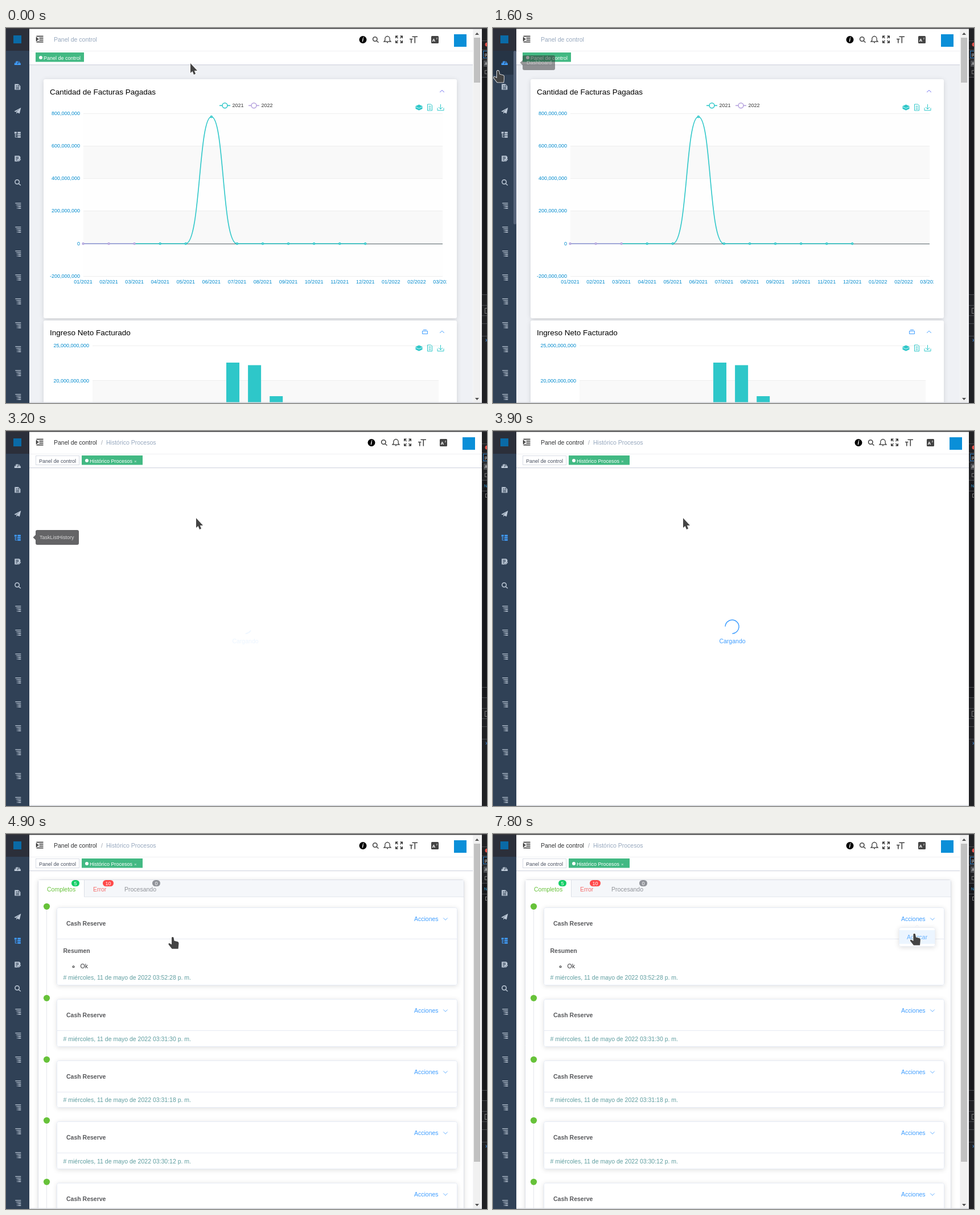
An HTML page with a canvas that plays this animation: 845x659 px, repeating every 8 s.

```html
<!DOCTYPE html>
<html lang="es">
<head>
<meta charset="utf-8">
<style>
html, body { margin: 0; width: 100%; height: 100%; overflow: hidden; }
canvas { display: block; }
</style>
</head>
<body>
<canvas id="stage" width="845" height="659"></canvas>
<script>
const ctx = document.getElementById('stage').getContext('2d');
const LOOP = 8000;
const TEAL = '#2ec7c9', PURPLE = '#b6a2de', BLUE = '#409eff', AXIS = '#008acd', PALE = '#bfcbd9';

// time, x, y of the pointer tip
const POINTER = [
  [0, 324, 62], [100, 324, 62], [300, 320, 70], [500, 320, 70], [800, 150, 104],
  [1000, 24, 100], [1100, 12, 80], [1200, 4, 53], [1300, 3, 46], [1400, 5, 44],
  [1500, 7, 52], [1700, 12, 98], [2200, 18, 182], [3100, 18, 182], [3200, 334, 153],
  [3900, 334, 153], [4000, 330, 150], [4700, 330, 150], [5200, 239, 228], [5400, 243, 234],
  [5600, 243, 234], [5700, 330, 215], [5800, 600, 180], [5900, 733, 164], [6400, 733, 164],
  [6500, 744, 154], [7300, 744, 154], [7400, 741, 172], [7500, 741, 172],
  [7600, 751, 175], [7700, 751, 175], [7800, 741, 175], [8000, 741, 175]];

const ICON = {
  gauge: 'M-5.5 4A5.6 5.6 0 1 1 5.5 4ZM-4-.5h1.6v1.3H-4ZM2.4-.5H4V.8H2.4ZM-2.5-3h1.4v1.3h-1.4ZM.7 2.5L2-2.6l-1-.2L-.6 2.2Z',
  doc: 'M-5-5H1.5L5-1.5V5H-5ZM1-4V-1H4ZM-3-2.5v1.2h3v-1.2ZM-3 .2v1.2H3V.2ZM-3 2.5v1.2H3V2.5Z',
  plane: 'M-6 1L6-5.5 3.5 5-.3 3.1-2 5.5V2L4-3.6-3.2 2Z',
  tree: 'M-5.5-5h4v3h-4ZM0-5h5.5v3H0ZM0-1h5.5v2.6H0ZM0 2.6h5.5v2.6H0ZM-4.5-1.5h1v1.6h3v1h-3v2.6h3v1h-4Z',
  edit: 'M-5-5H3L5-3V0L0 5H-5ZM-3-3v1.2h5V-3ZM-3-.7v1.2h5V-.7ZM-3 1.7v1.2h3V1.7ZM1.5 4L5 .5l1 1L2.5 5H1Z',
  list: 'M-5-5.2H5v1.3H-5ZM-2-2.3h7V-1h-7ZM0 .6h5v1.3H0ZM0 3.6h5v1.3H0ZM-3.6-2.2h1V-1h-1ZM-2 .6h1v1.3h-1ZM-2 3.6h1v1.3h-1Z',
  search: 'M3-1A3.7 3.7 0 1 1-4.4-1A3.7 3.7 0 1 1 3-1ZM2 2L5.5 5',
  menu: 'M-6-5H6M-1-1.7H6M-1 1.7H6M-6 5H6M-6-2.5L-3 0-6 2.5Z',
  bell: 'M-6 3.8H6L4.2 2V-1A4.2 4.4 0 0 0-4.2-1V2ZM-1 5.7H1M0-5V-6.3',
  full: 'M-2-2L-5.5-5.5M-5.8-2V-5.8H-2M2-2L5.5-5.5M5.8-2V-5.8H2M-2 2L-5.5 5.5M-5.8 2V5.8H-2M2 2L5.5 5.5M5.8 2V5.8H2',
  size: 'M-2.5-5.2H7M2.3-5.2V6M-7-1H-1.5M-4.2-1V6',
  layers: 'M0-5L6-2.3V2.5L0 5.3-6 2.5V-2.3Z',
  sheet: 'M-4-5.5H2L4-3.5V5.5H-4ZM-2-2H2M-2 .5H2M-2 3H2',
  download: 'M0-5.5V3M-3.5-.5L0 3 3.5-.5M-5.5 1V5.3H5.5V1',
  box: 'M-4.5-1H4.5V4H-4.5ZM-3-3.2H3',
  up: 'M-3.7 2L0-1.8 3.7 2',
  down: 'M-3.7-2L0 1.8 3.7-2',
  arrow: 'M0 0V17L3.6 14 6 20 9 18.6 6.8 13H12Z',
  hand: 'M-2.6 1Q-1.5-1 .8.6L2 6.5 8 8Q10.2 8.8 9.8 12L9 20.5H-2L-8 13Q-8.6 10-6 11L-2.6 13Z'
};
for (const k in ICON) ICON[k] = new Path2D(ICON[k]);

const clamp = v => Math.max(0, Math.min(1, v));
const fade = (t, start, end) => clamp(Math.min(t - start, end + 200 - t) / 200);

function rect(x, y, w, h, color) { ctx.fillStyle = color; ctx.fillRect(x, y, w, h); }

function dot(x, y, r, color) {
  ctx.fillStyle = color;
  ctx.beginPath(); ctx.arc(x, y, r, 0, 7); ctx.fill();
}

function round(x, y, w, h, r, color) {
  ctx.fillStyle = color;
  ctx.beginPath(); ctx.roundRect(x, y, w, h, r); ctx.fill();
}

// y is the middle of the capital letters
function text(s, x, y, color, size = 10.5, align = 'left', style = '') {
  ctx.font = `${style} ${size}px "Liberation Sans", Arial, sans-serif`;
  ctx.textAlign = align;
  ctx.fillStyle = color;
  ctx.fillText(s, x, y + size * 0.355);
}

function icon(name, x, y, color, line = 0) {
  ctx.save();
  ctx.translate(x, y);
  if (line) { ctx.strokeStyle = color; ctx.lineWidth = line; ctx.stroke(ICON[name]); }
  else { ctx.fillStyle = color; ctx.fill(ICON[name], 'evenodd'); }
  ctx.restore();
}

function card(x, y, w, h, border) {
  ctx.save();
  ctx.shadowColor = 'rgba(0,0,0,.13)'; ctx.shadowBlur = 9; ctx.shadowOffsetY = 1.5;
  round(x, y, w, h, 3, '#fff');
  ctx.restore();
  if (border) {
    ctx.strokeStyle = border; ctx.lineWidth = 1;
    ctx.beginPath(); ctx.roundRect(x + .5, y + .5, w - 1, h - 1, 3); ctx.stroke();
  }
}

function toolbox(y) {
  icon('layers', 725.5, y, TEAL);
  ctx.strokeStyle = '#fff'; ctx.lineWidth = .8;
  ctx.beginPath(); ctx.moveTo(720, y - 1); ctx.lineTo(725.5, y + 1.6); ctx.lineTo(731, y - 1); ctx.stroke();
  icon('sheet', 744.5, y, TEAL, 1);
  icon('download', 763.5, y, TEAL, 1);
}

function lineChart() {
  const px = i => 135.5 + i * 45.07;
  for (let i = 0; i < 6; i++) {
    const y = 150 + i * 57.1;
    if (i < 5) rect(136, y, 631, 57.1, i % 2 ? '#f9f9f9' : '#fefefe');
    rect(136, Math.round(y), 631, 1, '#eee');
    text((800 - 200 * i) ? (800 - 200 * i) + ',000,000' : '0', 130, y, AXIS, 9, 'right');
  }
  rect(136, 379, 631, 1, '#5c6b70');
  ctx.strokeStyle = TEAL; ctx.lineWidth = 1.6;
  ctx.beginPath();
  ctx.moveTo(px(0), 379); ctx.lineTo(px(4), 379);
  ctx.bezierCurveTo(342, 379, 338, 156, px(5), 156);
  ctx.bezierCurveTo(384, 156, 379, 379, px(6), 379);
  ctx.lineTo(px(11), 379); ctx.stroke();
  rect(px(0), 378.2, px(2) - px(0), 1.6, PURPLE);
  for (let i = 0; i < 12; i++) {
    const y = i == 5 ? 156 : 379;
    dot(px(i), y, 2.2, i < 3 ? PURPLE : TEAL);
    dot(px(i), y, .7, '#cfeeee');
  }
  ctx.save();
  ctx.beginPath(); ctx.rect(66, 436, 708, 20); ctx.clip();
  for (let i = 0; i < 15; i++)
    text(String(i % 12 + 1).padStart(2, '0') + (i < 12 ? '/2021' : '/2022'), px(i), 445.5, AXIS, 9, 'center');
  ctx.restore();
  [[375, TEAL, '2021'], [426, PURPLE, '2022']].forEach(([x, color, label]) => {
    rect(x, 135.5, 19, 1.6, color);
    dot(x + 9.5, 136.3, 5.2, color);
    dot(x + 9.5, 136.3, 3.7, '#fff');
    text(label, x + 22.5, 136, '#333', 9);
  });
}

function dashboard() {
  rect(41, 65, 780, 594, '#eff1f5');
  card(66, 90, 726, 420);
  text('Cantidad de Facturas Pagadas', 77, 112.5, '#000', 13.5);
  icon('up', 766, 111, '#6c6cf0', 1);
  lineChart();
  toolbox(139.5);
  card(66, 514, 726, 160);
  text('Ingreso Neto Facturado', 77, 535.5, '#000', 13.5);
  icon('box', 736, 533.5, BLUE, 1);
  icon('up', 766, 534, BLUE, 1);
  rect(152, 558, 608, 1, '#eee');
  rect(152, 619, 608, 40, '#f9f9f9');
  rect(152, 619, 608, 1, '#eee');
  text('25,000,000,000', 146, 558, AXIS, 9, 'right');
  text('20,000,000,000', 146, 619.5, AXIS, 9, 'right');
  [588, 592.5, 647].forEach((y, i) => rect(387 + i * 38.1, y, 23, 659 - y, TEAL));
  toolbox(562.5);
}

function processes(t) {
  const p = clamp((t - 3950) / 500), ease = 1 - (1 - p) ** 2.4;
  ctx.save();
  ctx.globalAlpha = ease;
  ctx.translate(-22.5 * (1 - ease), 0);
  card(56, 80, 749, 620, '#dcdfe6');
  rect(57, 81, 747, 29, '#f5f7fa');
  rect(57, 110, 747, 1, '#e4e7ed');
  rect(57, 81, 80, 30, '#fff');
  rect(137, 81, 1, 29, '#dcdfe6');
  [['Completos', 72, '#67c23a', 115, 14, '5', '#13ce66'],
   ['Error', 153, '#f56c6c', 170, 19, '10', '#ff4949'],
   ['Procesando', 208, '#909399', 257, 14, '0', '#909399']].forEach(([name, x, color, bx, w, n, fill]) => {
    text(name, x, 97.5, color);
    round(bx, 81, w, 11, 5.5, fill);
    text(n, bx + w / 2, 86.8, '#fff', 9, 'center');
  });
  rect(71, 130, 1, 529, '#e4e7ed');
  [[129, 137, '52:28'], [290, 84, '31:30'], [398, 83, '31:18'], [505, 84, '30:12'], [613, 84, '']]
    .forEach(([y, h, time], i) => {
      dot(71.5, y - 1.7, 5.6, '#67c23a');
      card(89, y, 704, h, '#e6ebf5');
      rect(90, y + 55, 702, 1, '#e6e9f2');
      text('Cash Reserve', 106, y + 28, '#58595c', 10.5, 'left', 'bold');
      text('Acciones', 717, y + 20.5, BLUE);
      icon('down', 772, y + 20.5, BLUE, .8);
      if (time) text(`# miércoles, 11 de mayo de 2022 03:${time} p. m.`, 100.5, y + h - 14, '#5f9ea0');
      if (!i) {
        text('Resumen', 100.5, 205, '#58595c', 10.5, 'left', 'bold');
        dot(118.5, 233.3, 2, '#303133');
        dot(118.5, 233.3, 1, '#fff');
        text('Ok', 130.5, 232.2, '#303133');
      }
    });
  ctx.restore();
}

function dropdown(t) {
  const shown = t >= 7000, hover = t >= 7400;
  ctx.save();
  ctx.translate(0, 164);
  ctx.globalAlpha = shown ? 1 : .25;
  ctx.scale(1, shown ? 1 : .2);
  if (shown) {
    card(713, 0, 64, 34, '#ebeef5');
    icon('up', 745, -2, '#ebeef5', 1);
    if (hover) rect(714, 5, 62, 24, '#ecf5ff');
  }
  text('Acercar', 727, 17.5, hover ? '#66b1ff' : '#606266');
  ctx.restore();
}

function loading(t) {
  const s = t - 3000, angle = s / 2000 * 2 * Math.PI, k = clamp(s / 750);
  const tail = clamp((s - 750) / 750) * 2;
  ctx.save();
  ctx.globalAlpha = clamp((t - 3170) / 300);
  ctx.strokeStyle = BLUE; ctx.lineWidth = 1.5; ctx.lineCap = 'round';
  ctx.beginPath();
  ctx.arc(420, 344, 12, angle + tail, angle + tail + .05 + 4.5 * k * k * (3 - 2 * k));
  ctx.stroke();
  text('Cargando', 420.5, 369.5, BLUE, 10.5, 'center');
  ctx.restore();
}

function header(t) {
  const second = t >= 3200, dx = second && t < 4000 ? 15 : 0;
  rect(41, 2, 795, 63, '#fff');
  rect(41, 40, 795, 1, '#eff0f3');
  rect(41, 64, 795, 1, '#d5d8e4');
  rect(41, 65, 795, 1, 'rgba(0,0,0,.04)');
  icon('menu', 59.5, 19.5, '#222', 1.4);
  text('Panel de control', 84, 20.5, second ? '#303133' : '#97a8be');
  if (second) {
    text('/', 167, 20.5, '#a0a6b0');
    text('Histórico Procesos', 176, 20.5, '#97a8be');
    ctx.strokeStyle = '#d8dce5'; ctx.lineWidth = 1;
    ctx.strokeRect(52.5, 43.5, 76, 16);
    text('Panel de control', 58, 53, '#495060', 9);
    rect(133, 43, 107, 16.5, '#42b983');
    dot(142, 52, 3, '#fff');
    text('Histórico Procesos', 147, 53, '#fff', 9);
    text('×', 225, 53.5, '#d5efe3', 8);
  } else {
    rect(52, 43, 85, 16.5, '#42b983');
    dot(61, 52, 3, '#fff');
    text('Panel de control', 66, 53, '#fff', 9);
  }
  ctx.save();
  ctx.translate(dx, 0);
  dot(627, 20.5, 6.5, '#000');
  text('i', 627, 20.5, '#fff', 10, 'center', 'italic bold');
  icon('search', 649, 20.5, '#444', 1.6);
  icon('bell', 670, 20, '#333', 1.2);
  icon('full', 690.5, 20, '#333', 1.4);
  icon('size', 716, 20.5, '#444', 1.6);
  round(747, 14, 13, 13, 1.5, '#444');
  text('A', 751.5, 21, '#fff', 8, 'center', 'bold');
  text('z', 757, 18, '#fff', 5, 'center');
  rect(787, 11, 22, 22, '#0a8fd8');
  ctx.restore();
}

function sidebar(t, x, y) {
  const inside = x < 41 && t < 3200, active = t < 3200 ? 0 : 3;
  rect(0, 0, 41, 659, '#304156');
  if (inside) rect(0, 40 + Math.floor((y - 40) / 42) * 42, 41, 42, '#263445');
  rect(0, 0, 41, 40, '#2b2f3a');
  rect(13, 13, 14, 14, '#0a6aa6');
  const names = ['gauge', 'doc', 'plane', 'tree', 'edit', 'search'];
  for (let i = 0; i < 15; i++) {
    const name = names[i] || 'list';
    icon(name, i < 6 ? 20.3 : 21.3, 61 + i * 42 - (i < 6 ? 0 : .5) + (i > 0 && i < 6 ? .5 : 0),
      i == active ? BLUE : PALE, name == 'search' ? 1.5 : 0);
  }
  if (inside) round(36, 40, 5, 305, 2.5, '#56647a');
}

function tooltip(label, w, y, alpha) {
  if (!alpha) return;
  ctx.save();
  ctx.globalAlpha = alpha;
  ctx.fillStyle = '#303133';
  ctx.beginPath();
  ctx.roundRect(52, y - 13, w, 26, 3);
  ctx.moveTo(52, y - 4.5); ctx.lineTo(47.5, y); ctx.lineTo(52, y + 4.5);
  ctx.fill();
  text(label, 59, y - .5, '#fff', 9);
  ctx.restore();
}

function scrollbar(end) {
  rect(820, 2, 16, 657, '#f6f6f7');
  rect(821, 2, 13, 656, '#f1f1f1');
  rect(822, 17, 11, end - 17, '#c1c1c1');
  ctx.fillStyle = '#505050';
  ctx.beginPath();
  ctx.moveTo(824, 12); ctx.lineTo(827.5, 8); ctx.lineTo(831, 12);
  ctx.moveTo(824, 650); ctx.lineTo(827.5, 654); ctx.lineTo(831, 650);
  ctx.fill();
}

function sidePanel(t) {
  rect(836, 0, 9, 659, '#202124');
  rect(838, 88, 7, 380, '#17181b');
  for (const y of [22, 38, 54, 86, 468, 487, 505, 519, 541]) rect(836, y, 9, 1, '#4a4c50');
  dot(845, 29, 3.5, '#e05048');
  ctx.strokeStyle = '#2c7bc0'; ctx.lineWidth = 1;
  ctx.strokeRect(838.5, 40.5, 10, 12);
  text('p', 841, 46, '#ddd', 8);
  rect(839, 57, 6, 11, '#4b4d51');
  text('A', 841, 62.5, '#ddd', 7);
  ctx.strokeStyle = '#777';
  ctx.strokeRect(841.5, 74.5, 6, 6);
  ctx.strokeRect(841.5, 492.5, 6, 9);
  text('›', 842, 548, BLUE, 10);
  if (t >= 3200) {
    rect(836, 105, 9, 1, '#4a4c50');
    text('N', 840, 97, '#35a5e5', 7);
    ctx.strokeRect(842.5, 110.5, 6, 6);
    rect(836, 450, 9, 1, '#4a4c50');
  }
}

function pointer(t, x, y) {
  const name = x < 41 || (t >= 4000 && t < 5000) || t >= 6500 ? 'hand' : 'arrow';
  icon(name, x, y, '#fff', 1.6);
  icon(name, x, y, '#444');
}

function pointerAt(t) {
  const i = POINTER.findIndex(k => k[0] > t);
  const a = POINTER[i - 1], b = POINTER[i], p = (t - a[0]) / (b[0] - a[0]);
  return [a[1] + (b[1] - a[1]) * p, a[2] + (b[2] - a[2]) * p];
}

function draw(t) {
  const [x, y] = pointerAt(t);
  rect(0, 0, 845, 659, '#fff');
  if (t < 3200) dashboard();
  else if (t < 4000) loading(t);
  else processes(t);
  header(t);
  if (t < 3200) scrollbar(96);
  else if (t >= 4000) scrollbar(576);
  if (t >= 6800) dropdown(t);
  sidebar(t, x, y);
  sidePanel(t);
  rect(0, 0, 845, 1.5, '#3a3a3c');
  rect(41, 657.5, 795, 1.5, '#d3d5db');
  tooltip('Dashboard', 57, 61, fade(t, 1180, 1500));
  tooltip('Nota de Liberaciones', 100, 103, Math.max(fade(t, 950, 1150), fade(t, 1650, 1850)));
  tooltip('TaskListHistory', 76, 187, fade(t, 2000, 3150));
  pointer(t, x, y);
}

function tick() {
  draw(Math.floor(performance.now() % LOOP / 100) * 100);
  requestAnimationFrame(tick);
}
tick();
</script>
</body>
</html>
```
